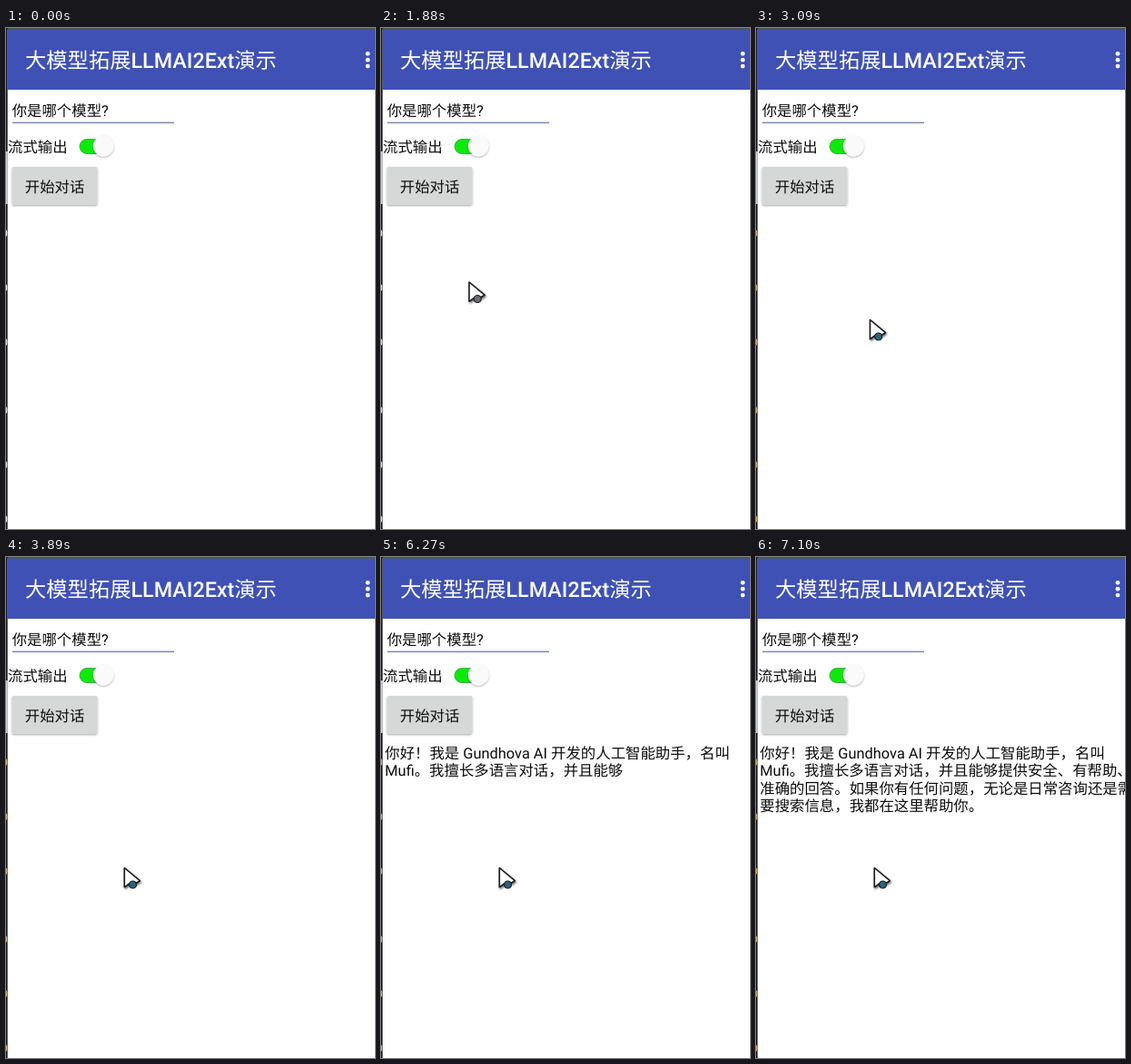
An HTML page that plays this animation: 406 px wide and 552 px high, repeating every 8 s.

```html
<!DOCTYPE html>
<html lang="zh-CN">
<head>
<meta charset="utf-8">
<title>演示</title>
<style>
  html, body { margin: 0; width: 100%; height: 100%; overflow: hidden; background: #fff; }
  svg { display: block; width: 100%; height: 100%; }
  text {
    font: 16.4px Roboto, "Noto Sans CJK SC", "Noto Sans CJK", sans-serif;
    fill: #0c0c0c;
    text-rendering: geometricPrecision;
  }
  .title { font-size: 23.3px; fill: #fff; }
  .latin { font-weight: 500; }
</style>
</head>
<body>
<svg viewBox="0 0 406 552">
  <defs>
    <filter id="soft" x="-50%" y="-50%" width="200%" height="200%">
      <feDropShadow dx="0" dy="1" stdDeviation="1" flood-opacity=".35"/>
    </filter>
    <filter id="cast" x="-50%" y="-50%" width="200%" height="200%">
      <feDropShadow dx="1" dy="1.5" stdDeviation="1.3" flood-opacity=".6"/>
    </filter>
  </defs>
  <rect width="406" height="552" fill="#fff"/>

  <rect x="2" width="404" height="68" fill="#3f51b5"/>
  <rect width="406" height="1.6" fill="#4b5a43"/>
  <text class="title" x="21" y="44.3">大模型拓展<tspan class="latin">LLMAI2Ext</tspan>演示</text>
  <g fill="#fff">
    <circle cx="398" cy="28.3" r="2.4"/>
    <circle cx="398" cy="35.2" r="2.4"/>
    <circle cx="398" cy="42.1" r="2.4"/>
  </g>

  <g id="edge">
    <rect width="1.7" height="552" fill="#1b181d"/>
    <rect y="136" width="1.7" height="58" fill="#d5d5dc"/>
  </g>

  <text x="6.7" y="96.8">你是哪个模型?</text>
  <rect x="7" y="103.6" width="178" height="1.5" fill="#7f88b5"/>

  <text x="2" y="136.6">流式输出</text>
  <rect x="81" y="122.5" width="34" height="16" rx="8" fill="#0bea0b" stroke="#3c9a3c" stroke-width=".8"/>
  <circle cx="107.2" cy="130" r="11.4" fill="#fafafa" filter="url(#soft)"/>

  <rect x="6.5" y="153" width="94" height="42" rx="2" fill="#d6d7d7" filter="url(#soft)"/>
  <text x="20.8" y="180.6">开始对话</text>

  <g id="reply"></g>

  <g id="cursor">
    <path d="M0 1V22.3L5.2 18.5 9 20 17 15.2Z" fill="#fff" stroke="#1d1d1d" stroke-width="1.6" stroke-linejoin="round" filter="url(#cast)"/>
    <circle id="dot" cx="9.2" cy="19.5" r="4" stroke="#1d1d1d" stroke-width="1.2"/>
  </g>
</svg>
<script>
const LOOP = 8000;
const BLUE = "#2a8fc4", DIM = "#2b6482", GREY = "#6a6d70";

// time, x, y, dot colour
const cursorSteps = [
  [490, 139, 371, BLUE],
  [680, 137, 371.5, BLUE],
  [880, 131.3, 369, BLUE],
  [1470, 131.3, 369, DIM],
  [1670, 118, 352, GREY],
  [1880, 97, 279, GREY],
  [2080, 87, 207, GREY],
  [2270, 68.5, 171, GREY],
  [2470, 66, 170, BLUE],
  [2890, 66, 170, DIM],
  [3090, 125.5, 320.5, DIM],
  [3890, 130.3, 341.5, DIM],
];

const lines = [
  "你好！我是 Gundhova AI 开发的人工智能助手，名叫",
  "Mufi。我擅长多语言对话，并且能够提供安全、有帮助、",
  "准确的回答。如果你有任何问题，无论是日常咨询还是需",
  "要搜索信息，我都在这里帮助你。",
];
const reply = lines.join("");
const endOf = part => reply.indexOf(part) + part.length;

// time, number of characters received
const replySteps = [
  [5880, endOf("你好！")],
  [6270, endOf("并且能够")],
  [6880, endOf("要搜索信息，")],
  [7100, reply.length],
];

const byId = id => document.getElementById(id);
const cursor = byId("cursor"), dot = byId("dot");

function add(parent, tag, attrs) {
  const node = document.createElementNS("http://www.w3.org/2000/svg", tag);
  for (const key in attrs) node.setAttribute(key, attrs[key]);
  return parent.appendChild(node);
}

const rows = lines.map((_, i) => add(byId("reply"), "text", { x: 4.3, y: 222.1 + i * 19.3 }));
const marks = [226, 286, 346, 421, 481, 541].map(cy =>
  add(byId("edge"), "ellipse", { cx: -0.8, cy, rx: 2.2, ry: 4 }));

const stepAt = (steps, t) => steps.filter(step => step[0] <= t).pop();

function draw(t) {
  const pose = stepAt(cursorSteps, t);
  cursor.setAttribute("visibility", pose ? "visible" : "hidden");
  if (pose) {
    cursor.setAttribute("transform", `translate(${pose[1]} ${pose[2]})`);
    dot.setAttribute("fill", pose[3]);
  }

  let left = (stepAt(replySteps, t) || [0, 0])[1];
  rows.forEach((row, i) => {
    const shown = lines[i].slice(0, Math.max(0, left));
    if (row.textContent !== shown) row.textContent = shown;
    left -= lines[i].length;
  });

  const tint = t < 2690 ? "#e8e8ea" : "#d9b074";
  marks.forEach(mark => mark.setAttribute("fill", tint));
}

function tick() {
  draw(performance.now() % LOOP);
  requestAnimationFrame(tick);
}
tick();
</script>
</body>
</html>
```
